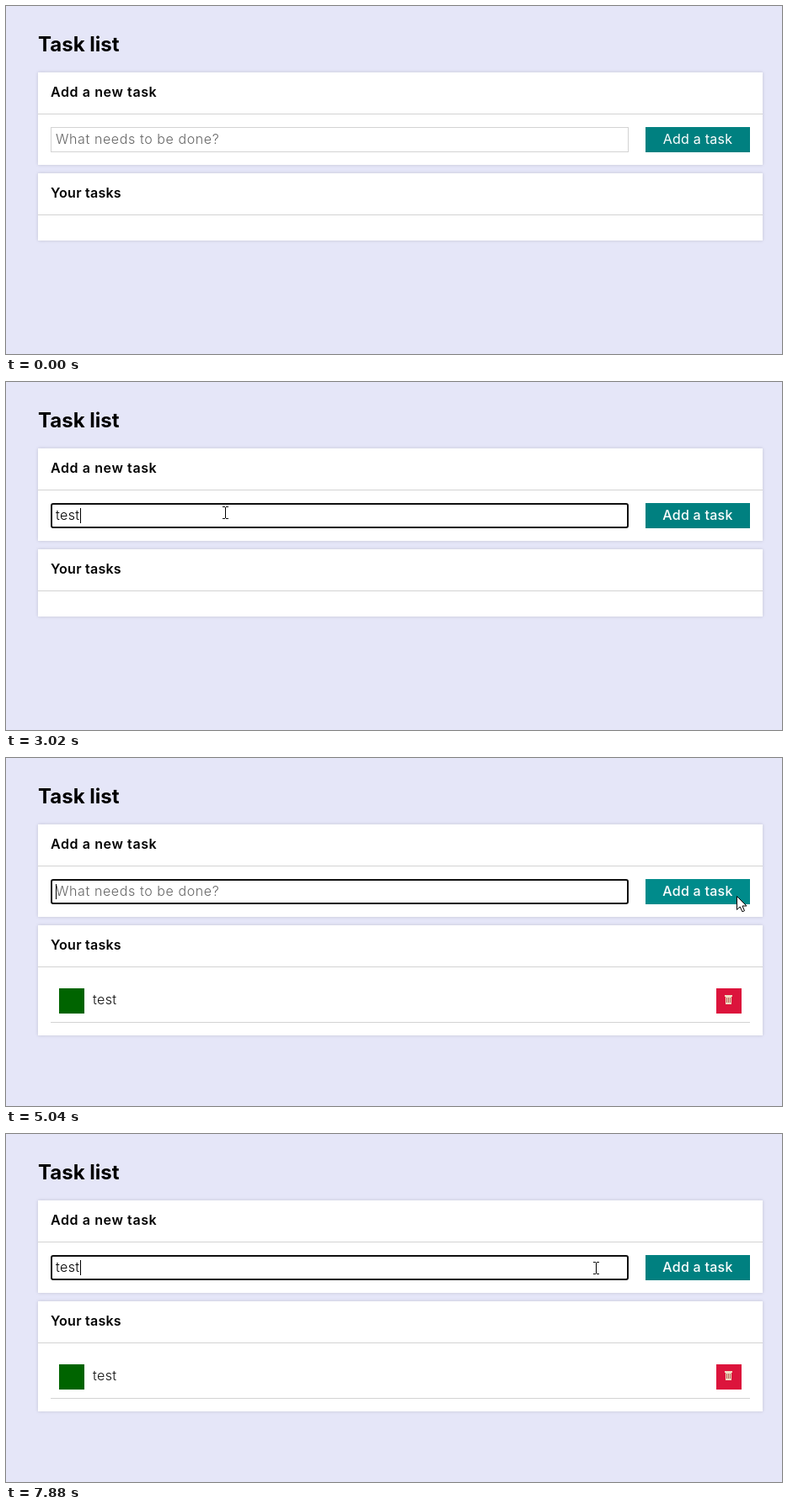
Recreate the animation shown at these times as an HTML page with a canvas. Size 921 px wide and 414 px high, loop 8 s.

```html
<!DOCTYPE html>
<html lang="en">
<head>
<meta charset="utf-8">
<title>Task list</title>
<style>
  html, body { margin: 0; width: 100%; height: 100%; overflow: hidden; background: #e5e6f8; }
  canvas { display: block; width: 921px; height: 414px; }
</style>
</head>
<body>
<canvas id="stage"></canvas>
<script>
const W = 921, H = 414, LOOP = 8000;
const canvas = document.getElementById('stage');
const ctx = canvas.getContext('2d');
const dpr = window.devicePixelRatio || 1;
canvas.width = W * dpr;
canvas.height = H * dpr;

const LINE = '#d3d3d3';
const FOCUS = 1230, SUBMIT = 5040;

// [time, content of the field]
const typing = [
  [0, ''], [2360, 't'], [2490, 'te'], [2820, 'tes'], [3020, 'test'],
  [SUBMIT, ''], [7280, 't'], [7350, 'te'], [7680, 'tes'], [7880, 'test']
];
const caretOn = [[FOCUS, 1700], [2230, 3550], [4080, 4610], [SUBMIT, 5590], [6150, 6680], [7210, LOOP]];
const clicks = [[1030, 1290], [4970, SUBMIT]];

// Pointer moves: start, end, steps, then start, control and end points
const moves = [
  [190, 960, 11, [800, 379], [476, 263], [260, 155]],
  [4080, 4500, 6, [260, 155], [590, 92], [872, 164]],
  [4500, 4840, 5, [872, 164], [871, 165], [867, 164]],
  [5590, 6080, 7, [867, 164], [780, 172], [712, 154]],
  [6080, 6280, 3, [712, 154], [704, 155], [700, 159]]
];

const within = (t, spans) => spans.some(([a, b]) => t >= a && t < b);
const ease = p => p * p * (3 - 2 * p);

function pointerAt(t) {
  const move = moves.filter(m => t >= m[0]).pop();
  if (!move) return null;
  const [start, end, steps, a, c, b] = move;
  const n = Math.floor((t - start) / (end - start) * steps + 0.001);
  const p = ease(Math.min(1, n / steps)), q = 1 - p;
  return a.map((v, i) => Math.round(q * q * v + 2 * q * p * c[i] + p * p * b[i]));
}

function inside(point, x, y, w, h) {
  return !!point && point[0] >= x && point[0] < x + w && point[1] >= y && point[1] < y + h;
}

function rect(x, y, w, h, color) {
  ctx.fillStyle = color;
  ctx.fillRect(x, y, w, h);
}

function setFont(size, weight, spacing) {
  ctx.font = `${weight} ${size}px Inter, "Open Sans", sans-serif`;
  ctx.letterSpacing = spacing + 'px';
}

function text(str, x, y, size, weight, color, spacing = 0) {
  setFont(size, weight, spacing);
  ctx.fillStyle = color;
  ctx.fillText(str, x, y);
}

function card(y, h, title, spacing) {
  ctx.save();
  ctx.shadowColor = 'rgba(0,0,0,0.15)';
  ctx.shadowBlur = 4 * dpr;
  rect(38, y, 860, h, '#fff');
  ctx.restore();
  rect(38, y + 49, 860, 1, LINE);
  text(title, 53, y + 29, 16, 600, '#000', spacing);
}

function field(t) {
  if (t >= FOCUS) {
    ctx.strokeStyle = '#101010';
    ctx.lineWidth = 2;
    ctx.beginPath();
    ctx.roundRect(54, 145, 684, 28, 2);
    ctx.stroke();
  } else {
    ctx.strokeStyle = LINE;
    ctx.lineWidth = 1;
    ctx.strokeRect(53.5, 144.5, 685, 29);
  }
  const value = typing.filter(k => t >= k[0]).pop()[1];
  if (value) text(value, 59, 164, 16, 300, '#000', 0.4);
  else text('What needs to be done?', 59, 164, 16, 300, '#666', 0.6);
  if (within(t, caretOn)) {
    setFont(16, 300, 0.4);
    rect(59 + Math.round(ctx.measureText(value).width), 150, 1, 18, '#000');
  }
}

function button(t, hover) {
  rect(759, 144, 124, 30, hover ? '#008b8b' : '#008080');
  ctx.textAlign = 'center';
  text('Add a task', 821, 164, 16, t < FOCUS ? 400 : 500, '#fff', 0.25);
  ctx.textAlign = 'left';
}

function task() {
  rect(63, 274, 30, 30, '#006400');
  text('test', 103, 293, 16, 300, '#111', 0.4);
  rect(843, 274, 30, 30, '#dc143c');
  rect(853, 282, 9, 2, '#f0dfc4');
  rect(854, 284, 7, 9, '#f0dfc4');
  for (const x of [855, 857, 859]) rect(x, 285, 1, 6, '#b5594f');
  rect(53, 314, 830, 1, LINE);
}

function arrow(x, y) {
  ctx.save();
  ctx.translate(x + 0.5, y + 0.5);
  ctx.beginPath();
  [[0, 0], [0, 16], [3.7, 12.5], [6.4, 18.3], [9, 17.2], [6.5, 11.5], [11.5, 11.5]]
    .forEach(p => ctx.lineTo(...p));
  ctx.closePath();
  ctx.fillStyle = '#fff';
  ctx.fill();
  ctx.strokeStyle = '#000';
  ctx.lineWidth = 1;
  ctx.stroke();
  ctx.restore();
}

function beam(x, y) {
  rect(x, y - 6, 1, 13, '#000');
  for (const end of [y - 7, y + 7]) {
    rect(x - 3, end, 3, 1, '#000');
    rect(x + 1, end, 3, 1, '#000');
  }
}

function highlight(x, y) {
  ctx.save();
  ctx.globalCompositeOperation = 'multiply';
  ctx.fillStyle = '#ffff69';
  ctx.beginPath();
  ctx.arc(x - 2, y - 1, 12, 0, Math.PI * 2);
  ctx.fill();
  ctx.restore();
}

function draw(t) {
  const pointer = pointerAt(t);
  const added = t >= SUBMIT;
  ctx.setTransform(dpr, 0, 0, dpr, 0, 0);
  rect(0, 0, W, H, '#e5e6f8');
  text('Task list', 38, 54, 24, 700, '#000');
  card(79, 110, 'Add a new task', 0.6);
  card(199, added ? 131 : 80, 'Your tasks', 0.25);
  field(t);
  button(t, inside(pointer, 759, 144, 124, 30));
  if (added) task();
  if (!pointer) return;
  if (within(t, clicks)) highlight(...pointer);
  if (inside(pointer, 53, 144, 686, 30)) beam(...pointer);
  else arrow(...pointer);
}

const begin = performance.now();
function tick() {
  draw((performance.now() - begin) % LOOP);
  requestAnimationFrame(tick);
}
tick();
</script>
</body>
</html>
```
